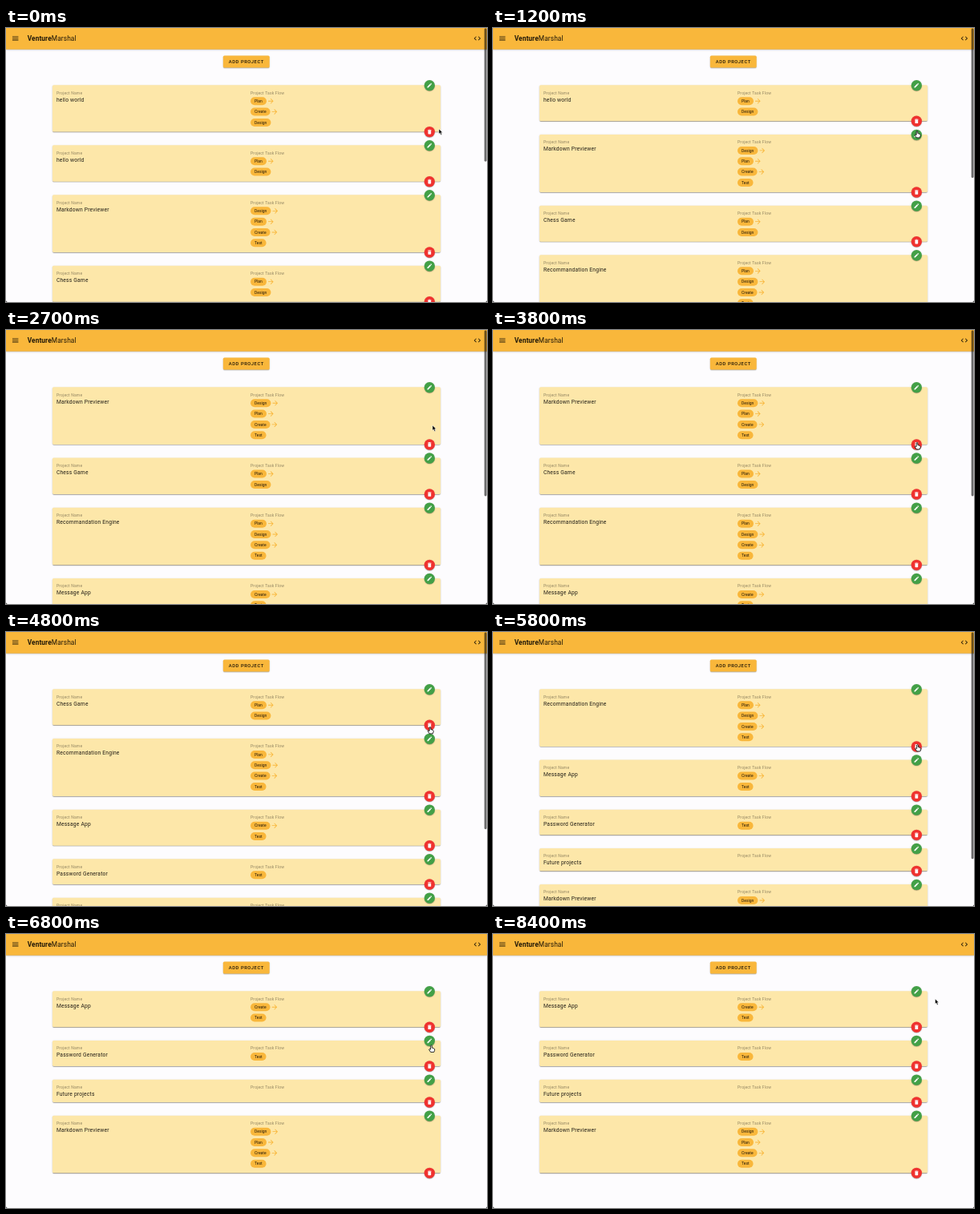
Animation of 600 by 342 pixels, one loop 8.5 s. Source, as an HTML page:

```html
<!DOCTYPE html>
<html lang="en">
<head>
<meta charset="utf-8">
<title>Project list</title>
<style>
html, body { margin: 0; width: 100%; height: 100%; overflow: hidden; background: #111; }
#stage {
  position: absolute; width: 1440px; height: 821px; overflow: hidden;
  transform: scale(.4166667); transform-origin: 0 0;
  background: #fdfcfe; border-radius: 0 0 5px 5px;
  font-family: Roboto, Arial, sans-serif; color: rgba(0,0,0,.87);
}
svg { display: block; fill: currentColor; }
header {
  position: absolute; inset: 0 0 auto; height: 64px; background: #f9b73b;
  box-shadow: 0 2px 4px -1px rgba(0,0,0,.2), 0 4px 5px rgba(0,0,0,.14), 0 1px 10px rgba(0,0,0,.12);
}
header svg { position: absolute; top: 19px; }
header div { position: absolute; left: 64px; font-size: 20px; line-height: 62px; letter-spacing: .0125em; }
#add {
  position: absolute; left: 650px; top: 83px; width: 139px; height: 36px;
  border-radius: 4px; background: #f9b73b; text-align: center;
  font-weight: 500; font-size: 14px; line-height: 36px; letter-spacing: .0893em;
}
#add, .fab { box-shadow: 0 3px 1px -2px rgba(0,0,0,.2), 0 2px 2px rgba(0,0,0,.14), 0 1px 5px rgba(0,0,0,.12); }
#list { position: absolute; left: 139px; top: 171px; width: 1162px; }
.card {
  position: relative; margin-bottom: 40px; border-radius: 4px; background: #fde7a9;
  box-shadow: 0 3px 1px -2px rgba(0,0,0,.3), 0 2px 2px rgba(0,0,0,.2), 0 1px 5px rgba(0,0,0,.12);
}
.card > * { position: absolute; }
.label { top: 13px; font-size: 12px; line-height: 20px; letter-spacing: .0333em; color: rgba(0,0,0,.42); }
.name { left: 12px; top: 32px; font-size: 16px; line-height: 24px; letter-spacing: .03125em; }
.flow { left: 593px; top: 36px; }
.step { display: flex; height: 24px; margin-bottom: 8px; color: #f9b73b; }
.step span {
  padding: 0 12px; margin-right: 1px; border-radius: 12px; background: #f9b73b;
  color: rgba(0,0,0,.87); font-size: 12px; line-height: 24px;
}
.fab { left: 1113px; width: 32px; height: 32px; border-radius: 50%; color: #fff; }
.fab svg { margin: 7px; }
.edit { top: -15px; background: #43a047; }
.del { bottom: -16px; background: #ef322f; }
#bar { position: absolute; right: 1px; top: 1px; width: 7px; border-radius: 4px; background: rgba(0,0,0,.58); }
#cursor { position: absolute; left: 0; top: 0; overflow: visible; }
</style>
</head>
<body>
<div id="stage">
  <div id="list"></div>
  <div id="add">ADD PROJECT</div>
  <header><div><b>Venture</b>Marshal</div></header>
  <div id="bar"></div>
  <svg id="cursor" width="1" height="1"><path stroke-linejoin="round"/></svg>
</div>
<script>
const $ = s => document.querySelector(s);
const ICONS = {
  menu: 'M3 6H21V8H3zM3 11H21V13H3zM3 16H21V18H3z',
  code: 'M14.6 16.6L19.2 12L14.6 7.4L16 6L22 12L16 18zM9.4 16.6L4.8 12L9.4 7.4L8 6L2 12L8 18z',
  pencil: 'M20.7 7Q21.4 6.3 20.7 5.6L18.4 3.3Q17.7 2.6 17 3.3L15.1 5.1L18.9 8.9zM3 17.2V21H6.8L17.8 9.9L14.1 6.2z',
  bin: 'M19 4H15.5L14.5 3H9.5L8.5 4H5V6H19zM6 19Q6 21 8 21H16Q18 21 18 19V7H6z',
  arrow: 'M4 11V13H16L10.5 18.5L11.9 19.9L19.8 12L11.9 4.1L10.5 5.5L16 11z'
};
const ARROW = 'M0 0V15L3.5 12L6 18L9 16.8L6.5 11H11Z';
const HAND = 'M-2 0Q0 -3 2 0V6L8 8Q11 9 10 14L8 19H-2L-7 11Q-6 8 -2 11Z';
const icon = (name, size, style = '') =>
  `<svg viewBox="0 0 24 24" width="${size}" height="${size}" style="${style}"><path d="${ICONS[name]}"/></svg>`;

const projects = [
  ['hello world', 'Plan Create Design'],
  ['hello world', 'Plan Design'],
  ['Markdown Previewer', 'Design Plan Create Test'],
  ['Chess Game', 'Plan Design'],
  ['Recommandation Engine', 'Plan Design Create Test'],
  ['Message App', 'Create Test'],
  ['Password Generator', 'Test'],
  ['Future projects', ''],
  ['Markdown Previewer', 'Design Plan Create Test']
].map(([name, flow]) => {
  const steps = flow.split(' ').filter(Boolean);
  return { name, steps, height: Math.max(68, 44.3 + 32 * steps.length) };
});

const card = ({ name, steps, height }) => `<div class="card" style="height:${height}px">
  <div class="label" style="left:12px">Project Name</div>
  <div class="name">${name}</div>
  <div class="label" style="left:593px">Project Task Flow</div>
  <div class="flow">${steps.map((s, i) =>
    `<div class="step"><span>${s}</span>${i < steps.length - 1 ? icon('arrow', 24) : ''}</div>`).join('')}</div>
  <div class="fab edit">${icon('pencil', 18)}</div>
  <div class="fab del">${icon('bin', 18)}</div>
</div>`;

$('#list').innerHTML = projects.map(card).join('');
$('header').innerHTML += icon('menu', 24, 'left:16px') + icon('code', 24, 'left:1399px');
const cards = [...document.querySelectorAll('.card')];

const LOOP = 8500, SCALE = 2.4, VIEW = 821;
const deletions = [1200, 2300, 4100, 5100, 6100];
// time, x, y of the pointer tip
const path = [
  [0, 540, 126], [700, 529, 129], [1300, 529, 129], [1600, 532, 128], [1800, 529, 117],
  [2300, 529, 117], [2700, 532, 119], [3400, 529, 141], [4200, 529, 141], [4700, 529, 119],
  [5200, 529, 119], [5600, 529.5, 141], [6200, 529.5, 141], [6600, 530.5, 139.5],
  [7000, 530.5, 139.5], [7900, 552, 84], [8100, 552, 84], [8400, 551.5, 81], [8500, 551.5, 81]
];

function pointer(t) {
  const i = path.findIndex(p => p[0] > t);
  const [t0, x0, y0] = path[i - 1], [t1, x1, y1] = path[i];
  const u = (t - t0) / (t1 - t0), e = u * u * (3 - 2 * u);
  return [x0 + (x1 - x0) * e, y0 + (y1 - y0) * e].map(v => v * SCALE);
}

function draw(now) {
  const t = Math.floor(now % LOOP / 100) * 100;
  const gone = deletions.filter(d => t >= d).length;
  const [x, y] = pointer(t);
  let top = 171, over = false;
  cards.forEach((el, i) => {
    el.style.display = i < gone ? 'none' : '';
    if (i < gone) return;
    const h = projects[i].height;
    over ||= [top, top + h].some(cy => Math.hypot(x - 1268, y - cy) < 18);
    top += h + 40;
  });
  const content = top + 22;
  $('#bar').style.height = content > VIEW ? VIEW * VIEW / content - 2 + 'px' : 0;
  const shape = $('#cursor path');
  shape.setAttribute('d', over ? HAND : ARROW);
  shape.setAttribute('fill', over ? '#fff' : '#000');
  shape.setAttribute('stroke', over ? '#000' : '#fff');
  shape.setAttribute('stroke-width', over ? 2 : 1.2);
  $('#cursor').style.transform = `translate(${x}px,${y}px)`;
}

const start = performance.now();
(function frame() {
  draw(performance.now() - start);
  requestAnimationFrame(frame);
})();
</script>
</body>
</html>
```
